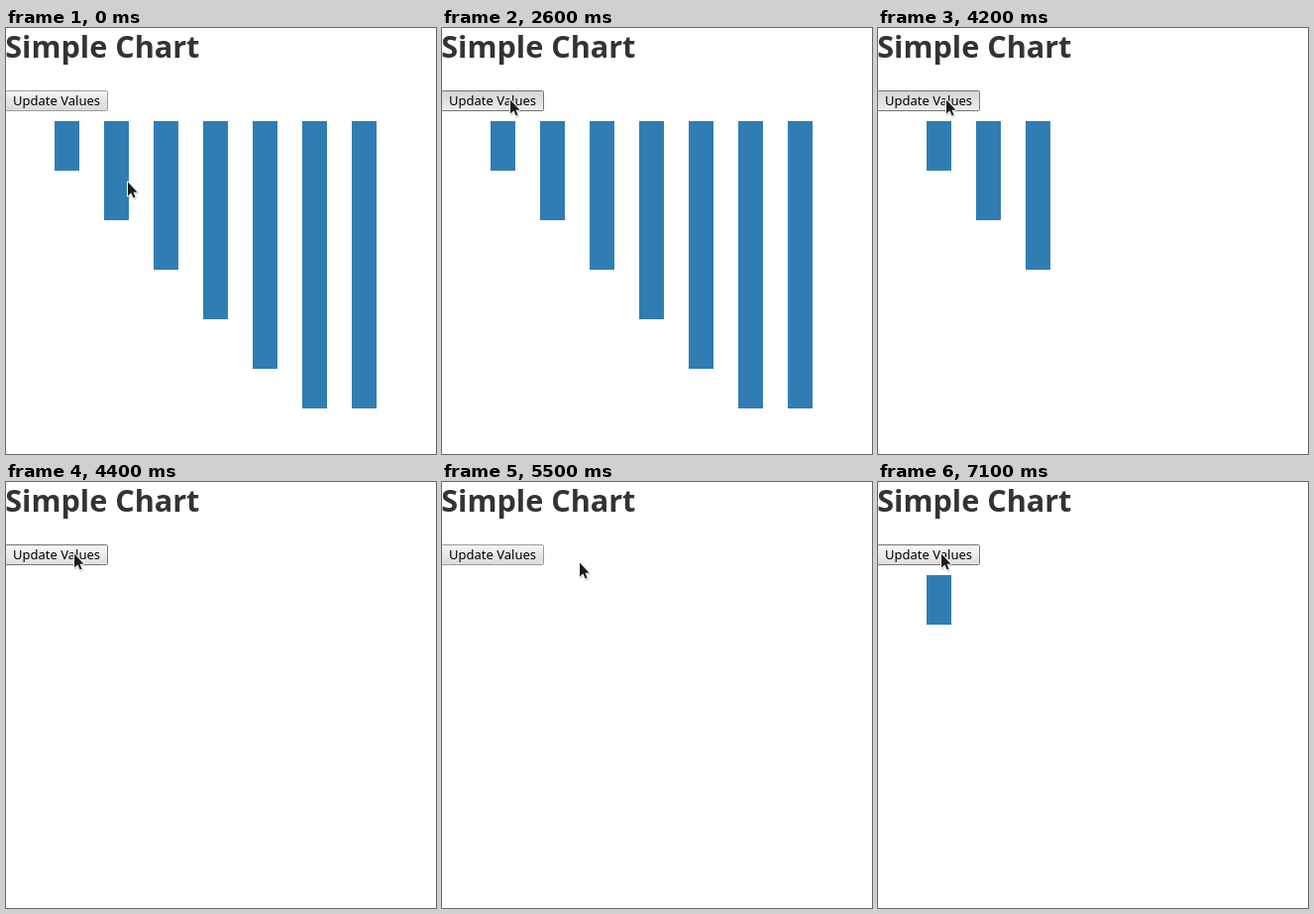
Animation, 434 px wide and 430 px high, one loop 8000 ms. Source, as an HTML page:

```html
<!DOCTYPE html>
<html lang="en">
<head>
<meta charset="utf-8">
<title>Simple Chart</title>
<style>
html, body { margin: 0; width: 100%; height: 100%; overflow: hidden; background: #fff; }
svg { display: block; font-family: "Noto Sans", "Open Sans", sans-serif; }
#shadow { fill: #000; stroke: #000; stroke-width: 2; stroke-linejoin: round; opacity: .2; }
#arrow { fill: #1c1c1c; stroke: #fff; stroke-width: 2; stroke-linejoin: round; paint-order: stroke; }
#button { fill: url(#normal); stroke: #9c9c9c; }
#button.over { fill: url(#hover); stroke: #747474; }
#button.down { fill: url(#pressed); }
</style>
</head>
<body>
<svg width="434" height="430" viewBox="0 0 434 430">
  <defs>
    <linearGradient id="normal" x2="0" y2="1">
      <stop stop-color="#f4f4f4"/><stop offset="1" stop-color="#d9d9d9"/>
    </linearGradient>
    <linearGradient id="hover" x2="0" y2="1">
      <stop stop-color="#f8f8f8"/><stop offset="1" stop-color="#dedede"/>
    </linearGradient>
    <linearGradient id="pressed" x2="0" y2="1">
      <stop stop-color="#d6d6d6"/><stop offset="1" stop-color="#ececec"/>
    </linearGradient>
    <path id="pointer" d="M1 1.5V15.5L4.4 12.5L6.6 17.6L8.6 16.7L6.5 11.7H10.6Z"/>
  </defs>
  <text x="-.8" y="30" font-size="30.6" font-weight="700" fill="#333">Simple Chart</text>
  <rect id="button" x="-.5" y="63.5" width="103" height="20" rx="1"/>
  <text x="7" y="78" font-size="13" fill="#000">Update Values</text>
  <g id="bars" fill="#307db3"></g>
  <g id="cursor">
    <use id="shadow" href="#pointer" x=".6" y="1"/>
    <use id="arrow" href="#pointer"/>
  </g>
</svg>
<script>
const LOOP = 8000, STEP = 100;
const byId = id => document.getElementById(id);
const button = byId('button'), cursor = byId('cursor'), bars = byId('bars');

const home = { x: 122, y: 154 };
const glides = [
  { from: 500, to: 700, x: 68, y: 71 },
  { from: 5100, to: 5400, x: 192, y: 81 },
  { from: 5400, to: 5900, x: 81, y: 79 },
  { from: 6500, to: 6700, x: 63, y: 71 }
];

const clamp = u => Math.max(0, Math.min(1, u));
const easeOut = u => 1 - (1 - u) ** 3;

function pointerAt(t) {
  let { x, y } = home;
  for (const g of glides) {
    const u = easeOut(clamp((t - g.from) / (g.to - g.from)));
    x += (g.x - x) * u;
    y += (g.y - y) * u;
  }
  return [Math.round(x), Math.round(y)];
}

const barCount = t => t < 2800 ? 7 : t < 4400 ? 3 : t < 7100 ? 0 : 1;
const isPressed = t => [2600, 4200].some(p => t >= p && t < p + 200);

for (let i = 0; i < 7; i++) {
  const height = Math.min(50 * (i + 1), 290);
  bars.innerHTML += `<rect x="${49 + 50 * i}" y="94" width="25" height="${height}"/>`;
}

function draw(t) {
  const [x, y] = pointerAt(t);
  const count = barCount(t);
  cursor.setAttribute('transform', `translate(${x} ${y})`);
  button.classList.toggle('over', x < 103 && y >= 63 && y < 84);
  button.classList.toggle('down', isPressed(t));
  [...bars.children].forEach((bar, i) =>
    bar.setAttribute('visibility', i < count ? 'visible' : 'hidden'));
}

const start = performance.now();
function tick() {
  const t = (performance.now() - start) % LOOP;
  draw(Math.floor(t / STEP) * STEP);
  requestAnimationFrame(tick);
}
tick();
</script>
</body>
</html>
```
